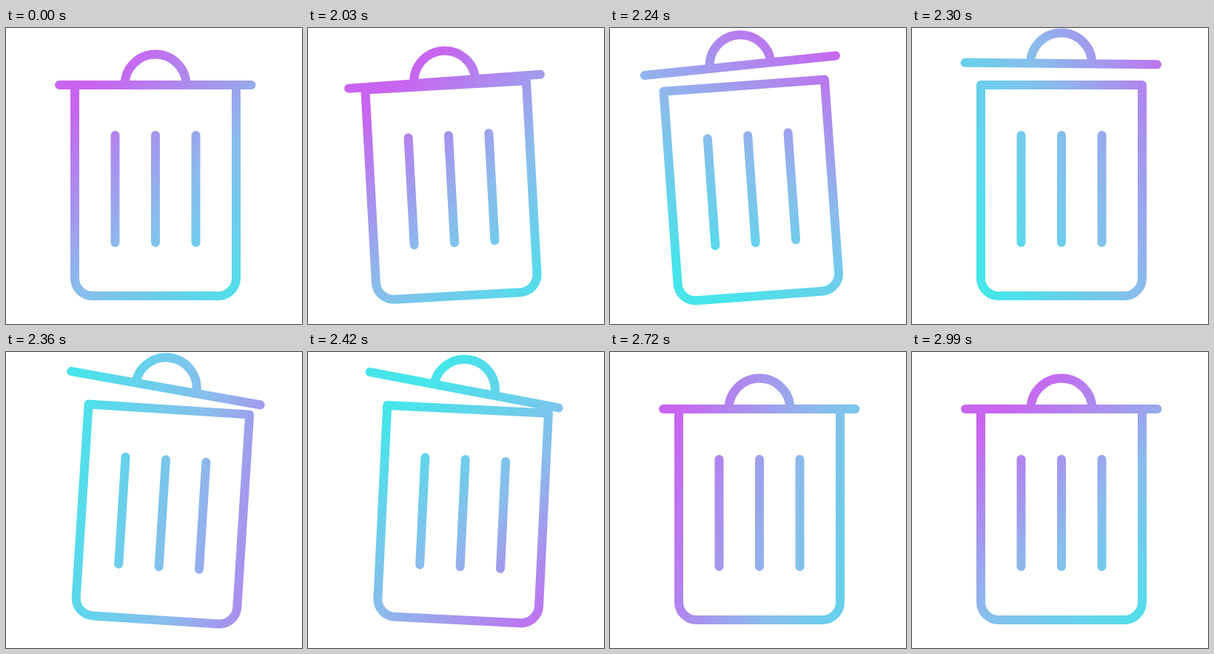
These frames come from a looping animation (400 px wide and 400 px high, 3.02 s). An HTML page with a canvas:

```html
<!DOCTYPE html>
<html lang="en">
<head>
<meta charset="utf-8">
<title>Trash can</title>
<style>
  html, body { margin: 0; width: 100%; height: 100%; overflow: hidden; background: #fff; }
  canvas { display: block; width: 400px; height: 400px; }
</style>
</head>
<body>
<canvas width="400" height="400"></canvas>
<script>
const ctx = document.querySelector('canvas').getContext('2d');
const LOOP = 3020, REST = 2000, STEP = 30, SPIN = 990, FLIGHT = 630;
const rad = Math.PI / 180;

const progress = (t, from, to) => Math.min(1, Math.max(0, (t - from) / (to - from)));

// Rises from 0 to 1 and falls back between two times.
const swing = (t, from, to) => Math.sin(Math.PI * progress(t, from, to));
const softSwing = (t, from, to) => swing(t, from, to) ** 2;

function pose(t) {
  const sway = 4 * swing(t, 300, 460) - 9.65 * swing(t, 0, 280);
  const tilt = 8.5 * softSwing(t, 280, 520)
    - 8.95 * softSwing(t, 0, 280) - 3.1 * softSwing(t, 480, 600);
  const flight = progress(t, 0, FLIGHT);
  const lift = 29 * 4 * flight * (1 - flight);
  const slide = -6 * Math.tanh(tilt * tilt / 5);
  const turn = 1 - (1 - progress(t, 0, SPIN) ** 1.8) ** 2.9;
  return { sway: sway * rad, tilt: tilt * rad, lift, slide, hue: (47 + 360 * turn) * rad };
}

function gradient(angle) {
  const x = 247, y = 212, half = 185;
  const dx = half * Math.cos(angle), dy = half * Math.sin(angle);
  const g = ctx.createLinearGradient(x - dx, y - dy, x + dx, y + dy);
  ['#c864f0', '#8abcec', '#46e5ea'].forEach((c, i) => g.addColorStop(i / 2, c));
  return g;
}

function line(x0, y0, x1, y1) {
  ctx.moveTo(x0, y0);
  ctx.lineTo(x1, y1);
}

function draw(t) {
  const { sway, tilt, lift, slide, hue } = pose(t);

  ctx.clearRect(0, 0, 400, 400);
  ctx.beginPath();
  ctx.save();

  // Can, swaying about the middle of its base
  ctx.translate(202, 362);
  ctx.rotate(sway);
  ctx.moveTo(-109, -285);
  ctx.lineTo(109, -285);
  ctx.arcTo(109, 0, 0, 0, 24);
  ctx.arcTo(-109, 0, -109, -285, 24);
  ctx.closePath();
  for (const x of [-54.5, 0, 54.5]) line(x, -217, x, -72);

  // Lid and handle
  ctx.translate(slide, -285 - lift);
  ctx.rotate(tilt);
  line(-130, 0, 129.5, 0);
  ctx.moveTo(-41.5, 0);
  ctx.arc(0, 0, 41.5, Math.PI, 0);

  // Stroke in stage space so one gradient covers every part
  ctx.restore();
  ctx.lineWidth = 12;
  ctx.lineCap = ctx.lineJoin = 'round';
  ctx.strokeStyle = gradient(hue);
  ctx.stroke();
}

function frame() {
  const t = performance.now() % LOOP - REST;
  draw(Math.max(0, Math.floor(t / STEP) * STEP));
  requestAnimationFrame(frame);
}
frame();
</script>
</body>
</html>
```
